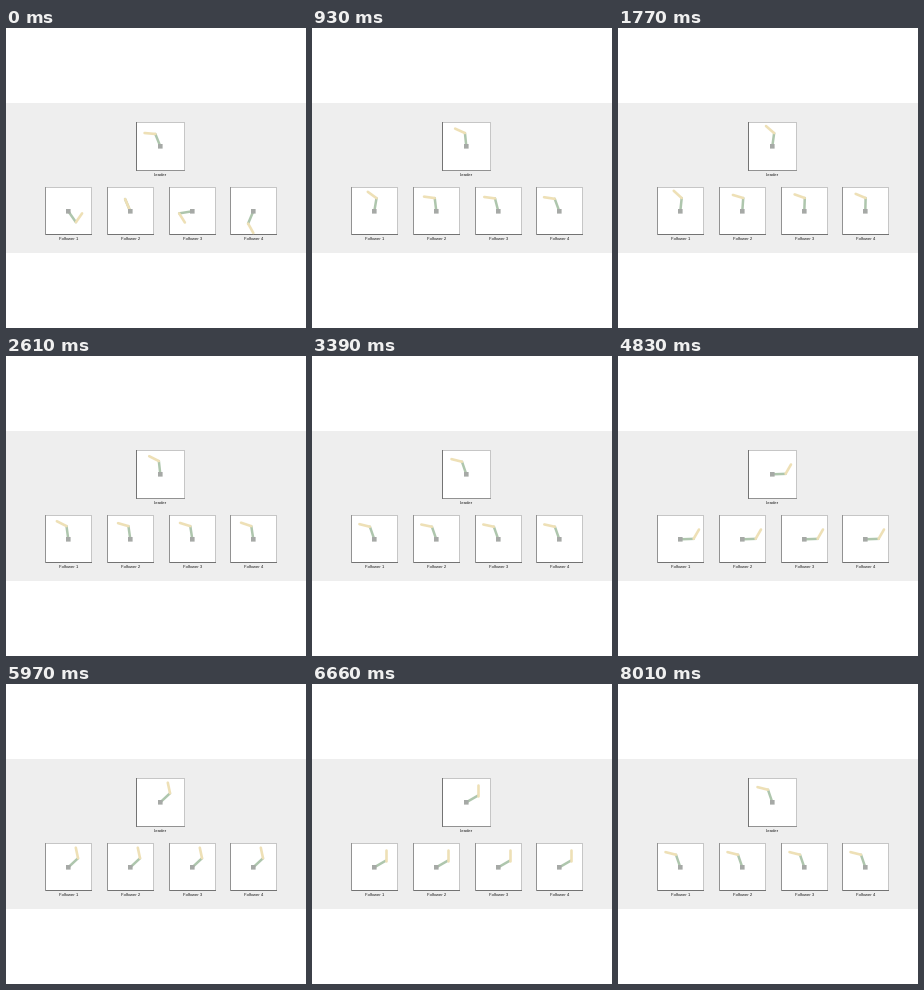
A matplotlib script for the animation above (8040 ms loop, 300 by 300 pixels).

```python
import numpy as np
import matplotlib.pyplot as plt
from matplotlib.animation import FuncAnimation
from matplotlib.patches import Rectangle

SIZE, DPI = 300, 100
STEP, FRAMES = 30, 268
L1, L2 = 13.3, 10.8
GREEN, SAND, HUB = "#aec6ad", "#eee0b6", "#a6a9a6"
DARK, MID, PALE = "#737373", "#929292", "#c6c6c6"

# Leader turning points: time (s), shoulder and elbow angle (deg)
KEYS = np.array([
    (0.00, 112, 63), (1.77, 82, 57), (3.39, 109, 57), (4.83, 2, 58),
    (5.97, 43, 59), (6.66, 30, 60), (8.01, 109, 57),
])

# Follower starting errors and the lag left when the leader first turns
FOLLOWERS = [
    (39, (-167, 47), (4, -4)),
    (101, (1, 117), (4, 19)),
    (163, (77, 50), (5, 15)),
    (224, (135, -11), (5, 12)),
]


def px(n):
    return n * 72 / DPI


def leader_pose(t):
    times = KEYS[:, 0]
    i = int(np.clip(np.searchsorted(times, t, side="right") - 1, 0, len(times) - 2))
    u = np.clip((t - times[i]) / (times[i + 1] - times[i]), 0, 1)
    u = u * u * (3 - 2 * u)
    return KEYS[i, 1:] * (1 - u) + KEYS[i + 1, 1:] * u


def follower_error(t, start, lag):
    s = t / 1.77
    bump = (s * np.exp(1 - s)) ** 9
    return np.array(start) * np.exp(-2.5 * t) + np.array(lag) * bump


def fill(x, y, w, h, color, z=1):
    ax.add_patch(Rectangle((x, y), w, h, fc=color, lw=0, antialiased=False, zorder=z))


class Arm:
    def __init__(self, x, y, w, h, label, left, bottom):
        self.base = np.array([x + w / 2 - 0.2, y + 24.3])
        fill(x, y, w, h, "white")
        fill(x + w - 1, y, 1, h, PALE)
        fill(x, y, w, 1, PALE)
        fill(x, y + h - 1, w, 1, bottom)
        fill(x, y, 1, h, left)
        self.lower, = ax.plot([], [], color=GREEN, lw=px(2.5), zorder=3,
                              solid_capstyle="round")
        self.upper, = ax.plot([], [], color=SAND, lw=px(2.6), zorder=4,
                              solid_capstyle="round")
        bx, by = self.base
        ax.add_patch(Rectangle((bx - 2.3, by - 2.3), 4.6, 4.6, fc=HUB, lw=0,
                               zorder=5, snap=False))
        ax.text(x + w / 2, y + h + 4.9, label, ha="center", va="baseline",
                color="#1c1c1c", fontsize=px(4.2), family="Liberation Sans")

    def pose(self, angles):
        a, b = np.radians(np.cumsum(angles))
        elbow = self.base + L1 * np.array([np.cos(a), -np.sin(a)])
        tip = elbow + L2 * np.array([np.cos(b), -np.sin(b)])
        self.lower.set_data(*zip(self.base, elbow))
        self.upper.set_data(*zip(elbow, tip))
        return self.lower, self.upper


fig = plt.figure(figsize=(SIZE / DPI, SIZE / DPI), dpi=DPI, facecolor="white")
ax = fig.add_axes([0, 0, 1, 1])
ax.set_xlim(0, SIZE)
ax.set_ylim(SIZE, 0)
ax.axis("off")

fill(0, 75, SIZE, 150, "#eeeeee", 0)
leader = Arm(130, 94, 49, 49, "Leader", DARK, MID)
followers = [Arm(x, 159, 47, 48, f"Follower {n}", MID, DARK)
             for n, (x, _, _) in enumerate(FOLLOWERS, 1)]


def draw(frame):
    t = frame * STEP / 1000
    target = leader_pose(t)
    artists = list(leader.pose(target))
    for arm, (_, start, lag) in zip(followers, FOLLOWERS):
        artists += arm.pose(target + follower_error(t, start, lag))
    return artists


anim = FuncAnimation(fig, draw, frames=FRAMES, interval=STEP, repeat=True, repeat_delay=0)
plt.show()
```
